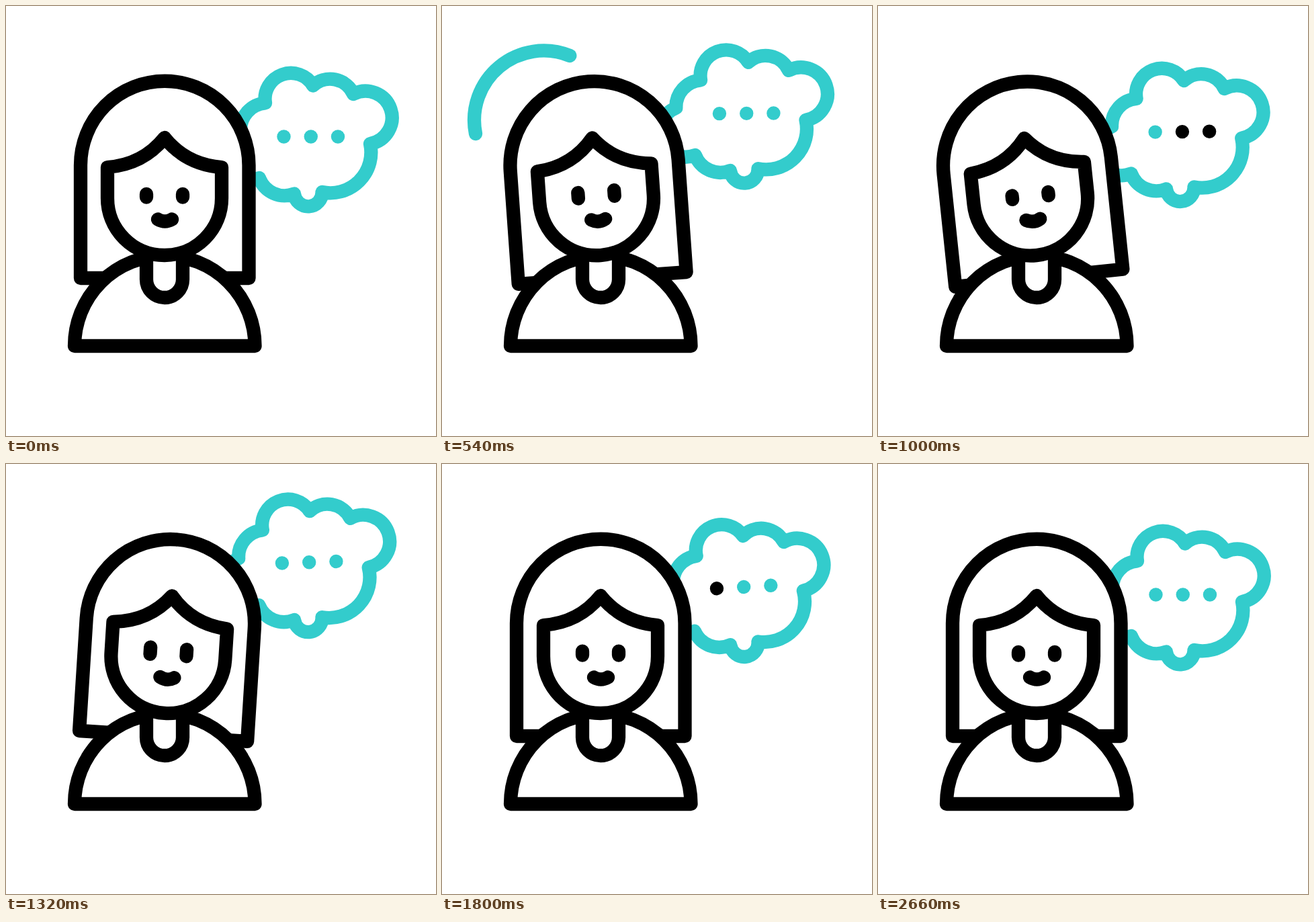
An HTML page that plays this animation: 640x640 px, repeating every 3220 ms.

```html
<!DOCTYPE html>
<html lang="en">
<head>
<meta charset="utf-8">
<title>Thinking woman</title>
<style>
html, body { margin: 0; width: 100%; height: 100%; overflow: hidden; background: #fff; }
svg { display: block; width: 100%; height: 100%; }
.line { stroke-width: 20.3; stroke-linecap: round; stroke-linejoin: round; fill: none; }
.black { stroke: #000; }
.teal { stroke: #33cccc; }
.solid { fill: #fff; }
</style>
</head>
<body>
<svg viewBox="0 0 640 640">
  <path id="swoosh" class="line teal" pathLength="1" d="M190.3 74A103.5 103.5 0 0 0 50 190"/>
  <g id="cloud">
    <path class="line teal solid" d="M349 185.5A40 40 0 0 1 386 144.5A38.5 38.5 0 0 1 457 118.5A38 38 0 0 1 517 131A39.5 39.5 0 1 1 542 205A60.5 60.5 0 0 1 470.5 277A20.8 20.8 0 0 1 429 279.5A40 40 0 0 1 377 256A37.5 37.5 0 1 1 349 185.5Z"/>
    <circle class="dot" cx="413.5" cy="194.5" r="10.2"/>
    <circle class="dot" cx="453.8" cy="194.5" r="10.2"/>
    <circle class="dot" cx="494" cy="194.5" r="10.2"/>
  </g>
  <g class="line teal">
    <path class="ray" pathLength="1" d="M269 96L249 58"/>
    <path class="ray" pathLength="1" d="M318 89L327 41"/>
    <path class="ray" pathLength="1" d="M358.5 119L405 91"/>
  </g>
  <g class="head line black">
    <path class="solid" d="M111 405V237A125.25 125.25 0 0 1 361.5 237V405Z"/>
  </g>
  <g class="line black">
    <path class="solid" d="M102 506A134.25 134.25 0 0 1 370.5 506Z"/>
    <path class="solid" d="M209 376V407A27 27 0 0 0 263 407V376"/>
  </g>
  <g class="head line black">
    <path class="solid" d="M151 240Q204 236 236 196Q268 236 321 240V286A85 85 0 0 1 151 286Z"/>
    <path id="eyes"/>
    <path d="M226 317.5Q236.5 323.5 247 317.5"/>
  </g>
</svg>
<script>
const LOOP = 3220;
const TEAL = '#33cccc';
const all = selector => [...document.querySelectorAll(selector)];
const [swoosh] = all('#swoosh');
const [cloud] = all('#cloud');
const [eyes] = all('#eyes');
const heads = all('.head');
const dots = all('.dot');
const rays = all('.ray');

// Keys are [time, value] pairs.
const headTurn = [[220, 0], [740, -6], [1010, -6], [1450, 6], [1790, 0]];
const cloudLift = [[220, 0], [700, -46], [1000, -7.3], [1340, -48.5], [2020, 0]];
const cloudTurn = [[220, 0], [540, -0.4], [760, 3.3], [1000, -0.6], [1320, -1.8], [1540, 3.3], [1800, -3.2], [2020, 0]];
const blinkStarts = [740, 1720];

const progress = (t, from, to) => Math.min(1, Math.max(0, (t - from) / (to - from)));
const ease = p => (1 - Math.cos(Math.PI * p)) / 2;

function valueAt(keys, t) {
  let value = keys[0][1];
  for (let i = 1; i < keys.length; i++) {
    const [t0, v0] = keys[i - 1];
    const [t1, v1] = keys[i];
    value += (v1 - v0) * ease(progress(t, t0, t1));
  }
  return value;
}

// Shows only the part of a path between two fractions of its length.
function trim(path, start, end) {
  path.style.display = end > start ? '' : 'none';
  path.style.strokeDasharray = `${end - start} 2`;
  path.style.strokeDashoffset = -start;
}

function draw(t) {
  const turn = `rotate(${valueAt(headTurn, t)} 236.3 371)`;
  heads.forEach(head => head.setAttribute('transform', turn));

  const lift = valueAt(cloudLift, t);
  cloud.setAttribute('transform',
    `translate(0 ${lift}) rotate(${valueAt(cloudTurn, t)} 450 277)`);
  dots.forEach((dot, i) => {
    const lit = blinkStarts.some(s => t >= s + i * 100 && t < s + i * 100 + 220);
    dot.setAttribute('fill', lit ? '#000' : TEAL);
  });

  // The eyes open wider as the cloud rises.
  const lid = 280 + lift * 0.12;
  eyes.setAttribute('d', `M209 ${lid}V284.5M263 ${lid}V284.5`);

  trim(swoosh, ease(progress(t, 740, 980)), ease(progress(t, 220, 540)));
  rays.forEach(ray => trim(ray, progress(t, 2440, 2650), progress(t, 2180, 2500)));
}

const began = performance.now();
function tick() {
  draw((performance.now() - began) % LOOP);
  requestAnimationFrame(tick);
}
draw(0);
requestAnimationFrame(tick);
</script>
</body>
</html>
```
